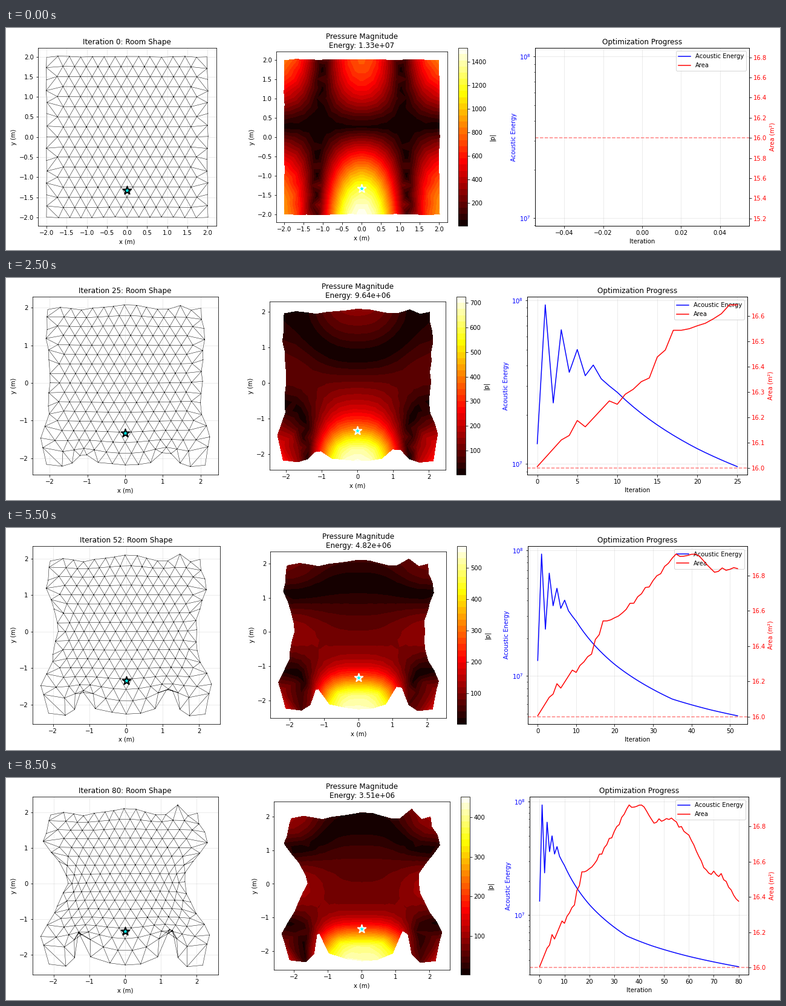
A matplotlib script that plays this animation: 1280x368 px, repeating every 9000 ms.

```python
import numpy as np
import matplotlib.pyplot as plt
from matplotlib.animation import FuncAnimation
from matplotlib.ticker import MultipleLocator
from matplotlib.tri import Triangulation

W, H, DPI = 1280, 368, 72
PANEL_H = 295
plt.rcParams.update({"font.family": "DejaVu Sans", "font.size": 10})
fig = plt.figure(figsize=(17.7778, 5.1112), dpi=DPI, facecolor="white")
rng = np.random.default_rng(4)

LAST = 80
ITERATIONS = [*range(0, 51, 5), 52, *range(55, LAST + 1, 5)]
STEPS = np.arange(LAST + 1)


def through(points):
    return np.array(points, float).T


def energy_history():
    early = [13.3, 93.7, 23.6, 66, 36.3, 50, 34.6, 40.2, 33.1]
    late = [(10, 27.4), (20, 12.4), (35, 6.56), (45, 5.38), (60, 4.33), (80, 3.51)]
    n, e = through([*enumerate(early), *late])
    return 1e6 * np.exp(np.interp(np.log1p(STEPS), np.log1p(n), np.log(e)))


def area_history():
    n, a = through([(0, 16.005), (3, 16.11), (4, 16.128), (5, 16.187), (6, 16.162),
                    (9, 16.264), (10, 16.251), (14, 16.365), (17, 16.535),
                    (22, 16.585), (36, 16.915), (42, 16.915), (46, 16.82),
                    (53, 16.85), (60, 16.745), (67, 16.545), (73, 16.52),
                    (80, 16.383)])
    return np.interp(STEPS, n, a) + rng.normal(0, 0.007, n[-1].astype(int) + 1) * (STEPS > 10)


ENERGY, AREA = energy_history(), area_history()


def square_outline(n=14):
    up = np.linspace(-2, 2, n + 1)[:-1]
    low = np.full(n, -2.0)
    return np.vstack([np.c_[up, low], np.c_[-low, up],
                      np.c_[-up, -low], np.c_[low, -up]])


def build_mesh():
    rim = square_outline()
    side = 0.5 / np.sqrt(3)
    inner = [((j + r % 2 / 2) * side, r * 0.25)
             for r in range(-7, 8) for j in range(-7, 8)
             if abs((j + r % 2 / 2) * side) < 1.75]
    points = np.vstack([rim, inner])
    tri = Triangulation(*points.T)
    laplace = np.zeros((len(points),) * 2)
    for a, b in tri.edges:
        laplace[a, b] = laplace[b, a] = -1
    np.fill_diagonal(laplace, -laplace.sum(1))
    n = len(rim)
    # Inner nodes follow the rim harmonically.
    spread = np.linalg.solve(laplace[n:, n:], -laplace[n:, :n])
    return rim, points, tri.triangles, spread


RIM, POINTS, TRIANGLES, SPREAD = build_mesh()
JITTER = np.clip(rng.normal(0, 0.04, RIM.shape), -0.06, 0.06)


def bump(v, centre, width):
    return np.exp(-((v - centre) / width) ** 2)


def settle(it):
    return 1 - np.exp(-it / 25)


def rim_shift(it):
    """Lobes and belly settle early, notches grow steadily, the waist comes late."""
    fast, slow, late = settle(it), it / LAST, (it / LAST) ** 2
    x, y = RIM.T
    floor, ceiling, wall = y == -2, y == 2, abs(x) == 2

    out = wall * (fast * (0.09 + 0.31 * bump(y, -1.5, 0.35))
                  + late * (0.2 * bump(y, 1.15, 0.4) - 0.47 * bump(y, 0.05, 0.65)))
    out += floor * slow * 0.42 * bump(abs(x), 0.75, 0.4)
    up = floor * (1.15 * slow * bump(abs(x), 1, 0.34) - 0.3 * fast)
    up += ceiling * (0.08 * fast * np.cos(2.3 * x) + 0.25 * slow * bump(x, 1.43, 0.15))
    return np.c_[np.sign(x) * out, up] + JITTER * (0.25 + 0.75 * fast)


def deformed(it):
    shift = rim_shift(it)
    return Triangulation(*(POINTS + np.vstack([shift, SPREAD @ shift])).T, TRIANGLES)


def pressure(it, x, y):
    """Room mode fading into a bump around the source, relative to its peak."""
    mode = np.cos(0.68 * (y + 2))
    centre_0, wall_0 = np.exp(-0.15 * (y + 2)) * mode, 0.6 * mode
    centre_1 = bump(y, -2.2, 0.9) + 0.14 * np.cos(0.85 * (y - 0.1))
    wall_1 = -0.26 * np.cos(1.4 * (y + 0.15))
    w = settle(it)
    centre = centre_0 + w * (centre_1 - centre_0)
    wall = wall_0 + w * (wall_1 - wall_0)
    side = np.sin(np.minimum(0.75 * abs(x), np.pi / 2)) ** (2 + 2 * it / LAST)
    return np.clip(abs(centre * (1 - side) - wall * side), 0.005, 0.999)


def peak_pressure(it):
    return 780 - 4.1 * it + 738 * np.exp(-it / 9)


def axes(left, top, width, height):
    return fig.add_axes([left / W, 1 - (top + height) / H, width / W, height / H])


def limits(v):
    margin = 0.05 * np.ptp(v)
    return v.min() - margin, v.max() + margin


def room_axes(box, mesh, step, edge):
    ax = axes(*box)
    ax.set(xlim=limits(mesh.x), ylim=limits(mesh.y), xlabel="x (m)", ylabel="y (m)")
    ax.xaxis.set_major_locator(MultipleLocator(step))
    ax.yaxis.set_major_locator(MultipleLocator(step))
    ax.scatter(0, -4 / 3, s=200, marker="*", c="cyan", edgecolors=edge,
               linewidths=2, zorder=5)
    return ax


def draw_history(box, it):
    ax = axes(*box)
    blue, = ax.semilogy(STEPS[:it + 1], ENERGY[:it + 1], "b-", label="Acoustic Energy")
    ax.set_title("Optimization Progress")
    ax.set_xlabel("Iteration")
    ax.set_ylabel("Acoustic Energy", color="b")
    ax.tick_params(axis="y", labelcolor="b")
    ax.grid(True, alpha=0.3)
    twin = ax.twinx()
    red, = twin.plot(STEPS[:it + 1], AREA[:it + 1], "r-", label="Area")
    twin.axhline(16, color="r", ls="--", alpha=0.5)
    twin.set_ylabel("Area (m²)", color="r")
    twin.tick_params(axis="y", labelcolor="r")
    if it == 0:
        ax.set(xlim=(-.055, .055), ylim=(8.94e6, 1.13e8))
        twin.set_ylim(15.126, 16.892)
    ax.legend(handles=[blue, red], loc="upper right")


def draw(k):
    fig.clear()
    it = ITERATIONS[k]
    mesh, peak = deformed(it), peak_pressure(it)
    aspect = np.ptp(mesh.x) / np.ptp(mesh.y)
    step = 1 if it else 0.5

    # Less than a decade of energy needs longer tick labels and narrower panels.
    drift = max(0, it - 45) / 35
    if it < 25:
        mid_left, mid_width, hist_left, hist_right = 447, 283, 875, 1229
    else:
        mid_left, mid_width = 436 + 7 * drift, 291
        hist_left, hist_right = 862 + 4 * drift, 1226 + 2 * drift
    mid_height = mid_width / aspect
    top = 39 + (mid_height - PANEL_H) / 2

    ax = room_axes((43.5 if it else 53, top, PANEL_H * aspect, PANEL_H),
                   mesh, step, "black")
    ax.triplot(mesh, "k-", lw=0.5)
    ax.grid(True, alpha=0.3)
    ax.set_title(f"Iteration {it}: Room Shape")

    ax = room_axes((mid_left, 39, mid_width, mid_height), mesh, step, "white")
    field = ax.tricontourf(mesh, peak * pressure(it, mesh.x, mesh.y),
                           levels=np.linspace(.004, 1, 30) * peak, cmap="hot")
    ax.set_title(f"Pressure Magnitude\nEnergy: {ENERGY[it]:.2e}")
    bar = axes(mid_left + mid_width + 18, top, 14.7, PANEL_H)
    fig.colorbar(field, cax=bar, label="|p|",
                 ticks=MultipleLocator(200 if peak > 850 else 100))

    draw_history((hist_left, top, hist_right - hist_left, PANEL_H), it)
    return []


anim = FuncAnimation(fig, draw, frames=len(ITERATIONS), interval=500,
                     init_func=lambda: [], repeat=True, repeat_delay=0)
plt.show()
```
